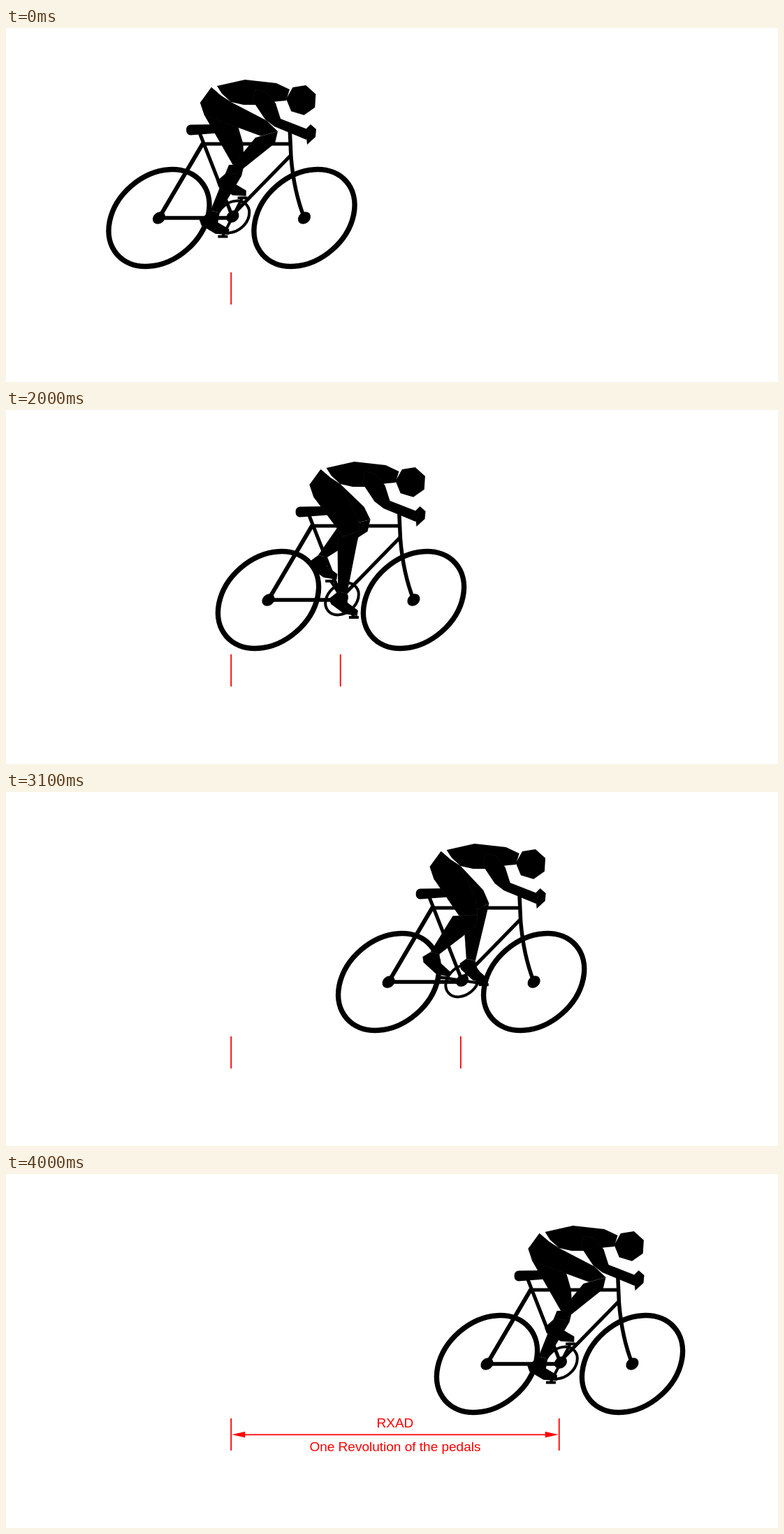
Recreate the animation shown at these times as an HTML page with a canvas. Size 1105x507 px, loop 6000 ms.

```html
<!DOCTYPE html>
<html lang="en">
<head>
<meta charset="utf-8">
<title>One revolution of the pedals</title>
<style>
html, body { margin: 0; width: 100%; height: 100%; overflow: hidden; background: #fff; }
canvas { display: block; }
</style>
</head>
<body>
<canvas id="stage" width="1105" height="507"></canvas>
<script>
const ctx = document.getElementById('stage').getContext('2d');
const LOOP = 6000, STEPS = 30, STRIDE = 15.65, START_X = 322.2;
const CRANK = [324.5, 270], CRANK_R = 31, CRANK_START = -63;
const RAD = Math.PI / 180, TILT = -41 * RAD;

// Front and back of the knee for every sixth of a turn
const KNEE = [
  [[389, 148], [357, 157]], [[366, 156], [328, 177]], [[350, 173], [318, 184]],
  [[341, 195], [319, 196]], [[342, 181], [309, 180]], [[365, 157], [318, 168]]
];
const TORSO = [[302, 83], [342, 74], [387, 79], [406, 88], [401, 104], [389, 105],
  [357, 110], [340, 110], [322, 106], [309, 94]];
const ARM = [[357, 88], [372, 91], [386, 108], [393, 130], [434, 146], [430, 160],
  [384, 141], [371, 131], [353, 104]];
const HAND = [[429, 145], [436, 138], [444, 145], [443, 156], [431, 167]];
const SOLE = [[-33, -26], [-31, -18], [-12, -4], [7, -1], [8, -9], [-7, -20]];

const mix = (p, q, u) => p.map((v, i) => v + (q[i] - v) * u);

function trace(points) {
  ctx.beginPath();
  for (const p of points) ctx.lineTo(...p);
  ctx.closePath();
}

function fill(points) {
  trace(points);
  ctx.fill();
}

function seam(points) {
  ctx.save();
  trace(points);
  ctx.clip();
  ctx.strokeStyle = '#484848';
  ctx.lineWidth = 0.8;
  ctx.setLineDash([1, 2]);
  ctx.stroke();
  ctx.restore();
}

function line(width, x1, y1, x2, y2) {
  ctx.lineWidth = width;
  ctx.beginPath();
  ctx.moveTo(x1, y1);
  ctx.lineTo(x2, y2);
  ctx.stroke();
}

// Tilted ellipse, outlined when a width is given
function oval(x, y, a, b, width) {
  ctx.beginPath();
  ctx.ellipse(x, y, a, b, TILT, 0, 2 * Math.PI);
  if (width) {
    ctx.lineWidth = width;
    ctx.stroke();
  } else ctx.fill();
}

function kneeAt(deg) {
  const turn = (deg - CRANK_START) / 60, i = Math.floor(turn);
  const next = KNEE[(i + 1) % 6];
  return KNEE[i % 6].map((p, side) => mix(p, next[side], turn - i));
}

function leg(deg) {
  const a = deg * RAD, c = Math.cos(a);
  const px = CRANK[0] + CRANK_R * c, py = CRANK[1] + CRANK_R * Math.sin(a);
  const [front, back] = kneeAt(deg);
  const ax = px - 13 - 5 * c, ay = py - 35;
  const shin = [ax + 6, ay + 2], heel = [ax - 7, ay - 1];

  const groin = [322, 106], bulge = mix(groin, front, 0.7);
  const thigh = [[294, 85], [308, 97], groin, [bulge[0] + 4, bulge[1] - 3],
    front, mix(back, front, 0.25), [284, 125], [278, 107]];
  const calf = [front, [front[0] - 4, front[1] + 17], shin, heel, back];

  // The foot rocks slightly as the pedal turns
  const rock = 6 * RAD * Math.cos(2 * (a - 15 * RAD));
  const cos = Math.cos(rock), sin = Math.sin(rock);
  const foot = [heel, ...SOLE.map(([x, y]) =>
    [px - 4 * c + x * cos - y * sin, py + x * sin + y * cos]), shin];

  line(4, ...CRANK, px, py);
  line(4, px - 7, py + 1, px + 7, py + 1);
  const parts = [thigh, calf, foot];
  parts.forEach(fill);
  parts.forEach(seam);
}

function bike() {
  for (const x of [219, 427]) {
    oval(x, 272, 79.6, 60.6, 7.5);
    oval(x, 272, 9.8, 8);
  }
  oval(324.5, 270.5, 26.3, 20, 4);
  oval(...CRANK, 9.8, 8);
  line(5, 277, 150, 324, 270);
  line(5, 281, 166, 408, 166);
  line(6, 282, 165, 219, 272);
  line(5.5, 219, 272, 324, 272);
  line(5, 408, 182, 324, 268);
  ctx.lineWidth = 5.5;
  ctx.stroke(new Path2D('M406 141L408 185Q412 234 427 272'));
  ctx.fill(new Path2D('M264 138.5L300 138L316 146L310 150L264 153.5Q258 153 258 146Q258 139 264 138.5Z'));
}

function rider(deg) {
  leg(deg + 180);
  leg(deg);
  const head = Array.from({ length: 7 }, (_, i) => {
    const a = (i * 360 / 7 - 125) * RAD;
    return [423 + 22 * Math.cos(a), 103 + 22 * Math.sin(a)];
  });
  [TORSO, ARM, HAND, head].forEach(fill);
  seam(ARM);
}

function arrowHead(x, dir) {
  fill([[x, 373.3], [x + 19 * dir, 369], [x + 19 * dir, 377.6]]);
}

function label(endX) {
  const mid = (START_X + endX) / 2;
  line(1.8, START_X + 15, 373.3, endX - 15, 373.3);
  arrowHead(START_X + 1, 1);
  arrowHead(endX - 1, -1);
  ctx.font = '19px "Liberation Sans", Arial, sans-serif';
  ctx.textAlign = 'center';
  ctx.fillText('RXAD', mid, 363);
  ctx.fillText('One Revolution of the pedals', mid, 396.5);
}

function draw(now) {
  const t = now % LOOP;
  const step = Math.max(0, Math.min(STEPS, Math.floor((t - 1000) / 100)));
  const shift = step * STRIDE;

  ctx.fillStyle = '#fff';
  ctx.fillRect(0, 0, 1105, 507);

  ctx.save();
  ctx.translate(shift, 0);
  ctx.fillStyle = ctx.strokeStyle = '#000';
  bike();
  rider(CRANK_START + step * 360 / STEPS);
  ctx.restore();

  ctx.fillStyle = ctx.strokeStyle = '#f00';
  line(1.8, START_X, 350, START_X, 396);
  if (step) line(1.8, START_X + shift, 350, START_X + shift, 396);
  if (step === STEPS) label(START_X + shift);
}

const begin = performance.now();
function tick() {
  draw(performance.now() - begin);
  requestAnimationFrame(tick);
}
tick();
</script>
</body>
</html>
```
